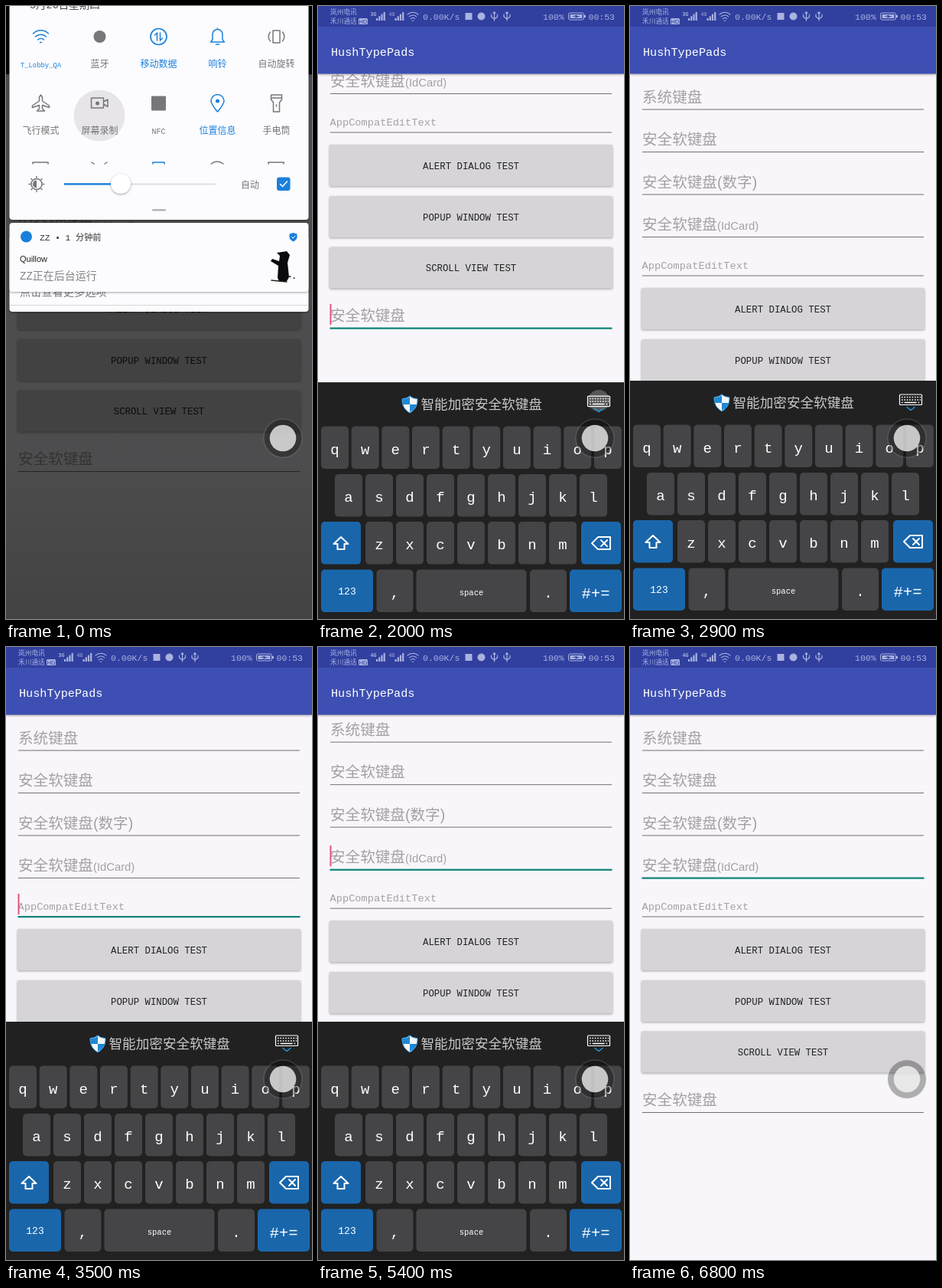
These frames come from a looping animation (400 by 800 pixels, 6900 ms). An HTML page:

```html
<!DOCTYPE html>
<html lang="zh">
<head>
<meta charset="utf-8">
<title>Keyboard demo</title>
<style>
html, body { margin: 0; width: 100%; height: 100%; overflow: hidden; background: #f8f6fa; }
svg { display: block; width: 100%; height: 100%; }
text { font-family: "Liberation Mono", "Noto Sans CJK SC", monospace; }
.sans { font-family: "Liberation Sans", "Noto Sans CJK SC", sans-serif; }
.mid { text-anchor: middle; }
.shadow { filter: drop-shadow(0 1px 1.5px rgba(0, 0, 0, .35)); }
.line { fill: none; stroke-width: 1.5; stroke-linejoin: round; stroke-linecap: round; }
</style>
</head>
<body>
<svg id="stage" viewBox="0 0 400 800">
  <defs>
    <linearGradient id="dim" x2="0" y2="1">
      <stop offset=".75" stop-opacity=".69"/><stop offset="1" stop-opacity=".73"/>
    </linearGradient>
  </defs>
</svg>
<script>
const LOOP = 6900, STEP = 100, KEYBOARD_HEIGHT = 311;
const BLUE = '#1a80dc', GRAY = '#77777a', HINT = '#a3a1a5', STATUS = '#a9b2e0';

const rect = (x, y, w, h, fill, rx = 0, extra = '') =>
  `<rect x="${x}" y="${y}" width="${w}" height="${h}" rx="${rx}" fill="${fill}" ${extra}/>`;
const circle = (x, y, r, fill, extra = '') =>
  `<circle cx="${x}" cy="${y}" r="${r}" fill="${fill}" ${extra}/>`;
const text = (x, y, size, fill, str, cls = '') =>
  `<text x="${x}" y="${y}" font-size="${size}" fill="${fill}" class="${cls}">${str}</text>`;
const stroke = (d, color, extra = '') => `<path d="${d}" class="line" stroke="${color}" ${extra}/>`;
const at = (x, y, content, extra = '') => `<g transform="translate(${x} ${y})" ${extra}>${content}</g>`;
const group = (id, content) => `<g id="${id}">${content}</g>`;

const WIFI = 'M-10-4A14 14 0 0 1 10-4M-7 0A10 10 0 0 1 7 0M-4 4A6 6 0 0 1 4 4M-1 7.5H1';

// Page
function page() {
  const underline = y => rect(16, y - .5, 368, 1, '#737175');
  const field = (y, str) => text(16, y - 9.5, 19.6, HINT, str, 'sans') + underline(y);
  const button = (y, str) => rect(15, y, 370, 54, '#d6d4d7', 2, 'class="shadow"') +
    text(200, y + 31.5, 12.35, '#222', str, 'mid');
  return field(135, '系统键盘') + field(190.5, '安全软键盘') + field(246, '安全软键盘(数字)') +
    field(301.5, '安全软键盘<tspan font-size="14.8">(IdCard)</tspan>') +
    text(15.5, 342.5, 13.7, HINT, 'AppCompatEditText') + underline(352) +
    button(368, 'ALERT DIALOG TEST') + button(435, 'POPUP WINDOW TEST') +
    button(501.5, 'SCROLL VIEW TEST') + field(607.5, '安全软键盘') +
    group('focus', rect(15.5, -1, 369, 2.2, '#0c8378') +
      rect(15.5, -31.5, 2, 27, '#e4507c', 0, 'id="cursor"'));
}

// Status bar and title
function header() {
  const signal = x => [0, 1, 2, 3].map(i =>
    rect(x + i * 3.2, 16 - i * 2.7, 2.2, 3 + i * 2.7, STATUS)).join('');
  const usb = x => stroke(`M${x} 19V8M${x - 4} 11V14L${x} 17L${x + 4} 14V11M${x - 1.5} 9.5L${x} 7.5L${x + 1.5} 9.5`,
    STATUS, 'style="stroke-width:1.2"');
  return rect(0, 0, 400, 88.5, '#3d4fb2', 0, 'class="shadow"') + rect(0, 0, 400, 27, '#313f9f') +
    text(16, 10.5, 8.7, STATUS, '岚州电讯') + text(16, 23, 8.7, STATUS, '禾川通话') +
    rect(53, 16, 12, 8, STATUS, 1.5) + text(59, 22.7, 7.5, '#313f9f', 'HD', 'mid sans') +
    `<text id="net" x="68.5" y="12.5" font-size="6.5" font-weight="bold" fill="${STATUS}"></text>` + signal(76) +
    text(92.5, 12.5, 6.5, STATUS, '4G') + signal(100.5) +
    at(124, 14, stroke(WIFI, STATUS, 'transform="scale(.7)"')) +
    text(137, 18, 11.5, STATUS, '0.00K/s') + rect(192.5, 9, 9, 9, STATUS) +
    circle(213.5, 13.5, 5, STATUS) + usb(230.5) + usb(247) +
    text(294, 18, 11.5, STATUS, '100%') +
    rect(327.5, 9, 20, 9, 'none', 2, `stroke="${STATUS}"`) + rect(329.5, 11, 16, 5, STATUS) +
    rect(348, 12, 2, 3, STATUS) + '<path d="M332 13.8L339 11.5L338 13.2H343L336 15.7L337 13.8Z" fill="#313f9f"/>' +
    text(353.5, 18, 11.5, STATUS, '00:53') + text(17, 65, 15.2, '#fff', 'HushTypePads');
}

// Soft keyboard, placed at its open position
function keyboard() {
  const WHITE = '#fff', DARK = '#454547', ACCENT = '#1a66ab';
  const key = (x, y, w, fill, label = '', size = 19, base = 36) =>
    rect(x, y, w, 55.5, fill, 5) + text(x + w / 2, y + base, size, WHITE, label, 'mid');
  const row = (letters, x, y, pitch) =>
    [...letters].map((c, i) => key(x + i * pitch, y, 36, DARK, c)).join('');
  const dots = [0, 1, 2].map(r => stroke(`M355 ${510.5 + r * 3.5}H${r < 2 ? 380 : 379}`, WHITE,
    `stroke-dasharray="${r < 2 ? '1.6 1.8' : '1.6 2 16 2'}" style="stroke-linecap:butt"`)).join('');
  const shield = 'M120 507Q124 510.5 130 510.5C130.5 519 127 525 120 529C113 525 109.5 519 110 510.5Q116 510.5 120 507Z';
  return rect(0, 489, 400, 320, '#212121') +
    `<path d="${shield}" fill="#f4f6f8"/>` +
    '<path d="M120 508V518H111Q110 515 110.5 511Q116 511 120 508ZM120 518H129Q127 524.5 120 528Z" fill="#2088d4"/>' +
    stroke(shield, '#2088d4', 'style="stroke-width:1"') +
    text(134.5, 523.5, 17.6, '#c8c8c8', '智能加密安全软键盘') +
    circle(367, 513, 14, '#999', 'id="press" opacity=".45"') +
    rect(352.5, 507, 29, 13.5, 'none', 1, 'stroke="#fff" stroke-width="1.2"') + dots +
    stroke('M362 523.5L367 527.5L372 523.5', '#2394dc') +
    row('qwertyuiop', 4, 546.5, 39.65) + row('asdfghjkl', 22, 609, 40) + row('zxcvbnm', 62, 671, 40) +
    key(4, 671, 52, ACCENT) + key(344, 671, 52, ACCENT) +
    stroke('M30 691L39.5 700H34.5V707H25.5V700H20.5Z', WHITE, 'style="stroke-width:2"') +
    stroke('M366 691H382V707H366L358 699ZM370 695L378 703M378 695L370 703', WHITE, 'style="stroke-width:2"') +
    key(4, 733.5, 68, ACCENT, '123', 13, 32.5) + key(76.5, 733.5, 48, DARK, ',') +
    key(128.5, 733.5, 144, DARK, 'space', 10.5, 33) + key(277, 733.5, 48, DARK, '.') +
    key(329, 733.5, 68, ACCENT, '#+=', 20.5, 37);
}

// Notification shade
function shade() {
  const tile = (col, row, label, color, icon, size = 12) => {
    const x = 45.5 + col * 77, y = 40 + row * 87;
    return at(x, y, icon) + text(x, y + 40, size, color, label, 'mid');
  };
  const glyph = (d, color, extra = '') => stroke(d, color) + extra;
  const tiles = [
    ['T_Lobby_QA', BLUE, glyph(WIFI, BLUE), 8.9],
    ['蓝牙', GRAY, circle(0, 0, 8, GRAY)],
    ['移动数据', BLUE, circle(0, 0, 10.5, 'none', `stroke="${BLUE}" stroke-width="1.7"`) +
      stroke('M-2 5V-5L-5-2M2-5V5L5 2', BLUE)],
    ['响铃', BLUE, glyph('M-9 7H9L6.5 4V-3A6.5 6.5 0 0 0-6.5-3V4ZM-2 10H2M0-11V-9.5', BLUE)],
    ['自动旋转', GRAY, glyph('M-4.5-8H4.5V8H-4.5ZM-8-6A9 9 0 0 0-8 6M8-6A9 9 0 0 1 8 6', GRAY)],
    ['飞行模式', GRAY, glyph('M0-11L2-8V-3L11 3V5.5L2 2.5V7L5 10H-5L-2 7V2.5L-11 5.5V3L-2-3V-8Z', GRAY)],
    ['屏幕录制', GRAY, glyph('M-11-7H5V6H-11ZM5-2L10.5-5V4.5L5 1', GRAY, circle(-3, 0, 2.5, GRAY))],
    ['NFC', GRAY, rect(-9.5, -9.5, 19, 19, GRAY, 1), 10],
    ['位置信息', BLUE, glyph('M0 11C-5 5-8.5 1-8.5-3A8.5 8.5 0 0 1 8.5-3C8.5 1 5 5 0 11Z', BLUE, circle(0, -3, 2.5, BLUE))],
    ['手电筒', GRAY, glyph('M-7-11H7V-5L4-1V11H-4V-1L-7-5ZM-7-7H7M0 2V4', GRAY)],
  ];
  const card = (y, h) => rect(4.5, y, 391, h, '#fcfcfe', 4, 'class="shadow"');
  const rays = [...Array(8)].map((_, i) => stroke('M0-8.5V-10', GRAY, `transform="rotate(${i * 45})"`)).join('');
  return card(300, 99) + text(18, 378, 14.2, GRAY, '点击查看更多选项') + rect(5, 390, 390, 1, '#d8d8da') +
    card(283, 90) + circle(26.5, 301, 7.5, BLUE) + text(44, 306, 11.2, '#333', 'ZZ • 1 分钟前') +
    '<path d="M375.5 296L380.5 297.5V302Q380 305 375.5 307.5Q371 305 370.5 302V297.5Z" fill="#1a80dc"/>' +
    stroke('M373.5 301.5L375 303L378 300', '#fff', 'style="stroke-width:1"') +
    text(18, 333.5, 11, '#222', 'Quillow', 'sans') + text(18, 357, 14, '#858588', 'ZZ正在后台运行') +
    '<path d="M354 322L367 320L371 325L368 335L370 354L367 359H357L355 355L356 339L346 333L348 330L357 333L358 326Z" fill="#0c0a0c"/>' +
    stroke('M347 358L367 360M370 353H372M376 355H377', '#222') +
    card(-30, 309) + text(31, 3, 13.5, '#444', '5月20日星期四') +
    circle(122, 143, 33.5, '#e7e5e8') +
    tiles.map(([label, color, icon, size], i) => tile(i % 5, Math.floor(i / 5), label, color, icon, size)).join('') +
    stroke('M35 206V204H55V206M112 204L115 206M132 204L129 206M268 206Q276 200 284 206M343 206V204H363V206', GRAY) +
    stroke('M192 206V204H207V206', BLUE) +
    at(40, 232.5, circle(0, 0, 7, 'none', `stroke="${GRAY}" stroke-width="1.6"`) + rays +
      `<path d="M0-5A5 5 0 0 0 0 5Z" fill="${GRAY}"/>`) +
    rect(150, 231.5, 124, 2, '#e0e0e2') + rect(76, 231.2, 74, 2.4, BLUE) +
    circle(150, 232, 13, '#fff', 'class="shadow"') + text(307, 237.5, 12, GRAY, '自动') +
    rect(354, 223.5, 17.5, 17.5, BLUE, 3) + stroke('M358.5 232.5L361.5 235.5L367.5 229', '#fff') +
    rect(191, 265, 18, 2.5, '#b4b4b6', 1);
}

const ball = circle(362, 564, 25, 'rgba(0,0,0,.3)', 'stroke="rgba(190,190,190,.2)" stroke-width="1.5"') +
  circle(362, 564, 17.3, 'rgba(255,255,255,.73)');

const stage = document.getElementById('stage');
stage.innerHTML += rect(0, 0, 400, 800, '#f8f6fa') + group('page', page()) + header() +
  group('keyboard', keyboard()) +
  group('scrim', rect(0, 0, 400, 800, 'url(#dim)') + rect(0, 0, 400, 89, '#000', 0, 'opacity=".85"')) +
  group('shade', shade()) + ball;

const part = Object.fromEntries([...stage.querySelectorAll('[id]')].map(e => [e.id, e]));

// Tracks are [time, value] points joined with a cosine ease.
const H = KEYBOARD_HEIGHT, SCROLL = 187;
const tracks = {
  shade: [[0, 0], [450, -420]],
  scrim: [[0, 1], [500, 0]],
  keyboard: [[800, H], [1114, 0], [1984, 0], [2290, H], [2580, H], [2890, 0],
    [4110, 0], [4390, H], [4590, H], [4890, 0], [5900, 0], [6220, H]],
  scroll: [[1150, 0], [1400, SCROLL], [2100, SCROLL], [2400, 0], [2910, 0], [3100, SCROLL], [3120, SCROLL], [3400, 0],
    [4910, 0], [5130, SCROLL], [5220, SCROLL], [5433, 0]],
};
const focuses = [[1000, 607.5], [3100, 352], [4600, 607.5], [5200, 301.5]];
const presses = [[1900, 2200], [4100, 4300], [5800, 6100]];

function valueAt(points, t) {
  const next = points.findIndex(p => p[0] > t);
  if (next === 0) return points[0][1];
  if (next < 0) return points[points.length - 1][1];
  const [t0, a] = points[next - 1], [t1, b] = points[next];
  return a + (b - a) * (1 - Math.cos(Math.PI * (t - t0) / (t1 - t0))) / 2;
}

function moveY(element, y) { element.setAttribute('transform', `translate(0 ${y.toFixed(2)})`); }
function show(element, on) { element.style.display = on ? '' : 'none'; }

function render(t) {
  moveY(part.shade, valueAt(tracks.shade, t));
  moveY(part.keyboard, valueAt(tracks.keyboard, t));
  moveY(part.page, -valueAt(tracks.scroll, t));
  part.scrim.setAttribute('opacity', valueAt(tracks.scrim, t));
  part.net.textContent = t < 3800 ? '3G' : '4G';
  show(part.press, presses.some(([from, to]) => t >= from && t < to));
  const focus = focuses.filter(f => f[0] <= t).pop();
  show(part.focus, focus);
  if (focus) {
    moveY(part.focus, focus[1]);
    moveY(part.cursor, focus[1] === 352 ? 1.5 : 0);
    show(part.cursor, Math.floor((t - focus[0]) / 500) % 2 === 0);
  }
}

function tick() {
  const t = performance.now() % LOOP;
  render(Math.floor(t / STEP) * STEP);
  requestAnimationFrame(tick);
}
tick();
</script>
</body>
</html>
```
